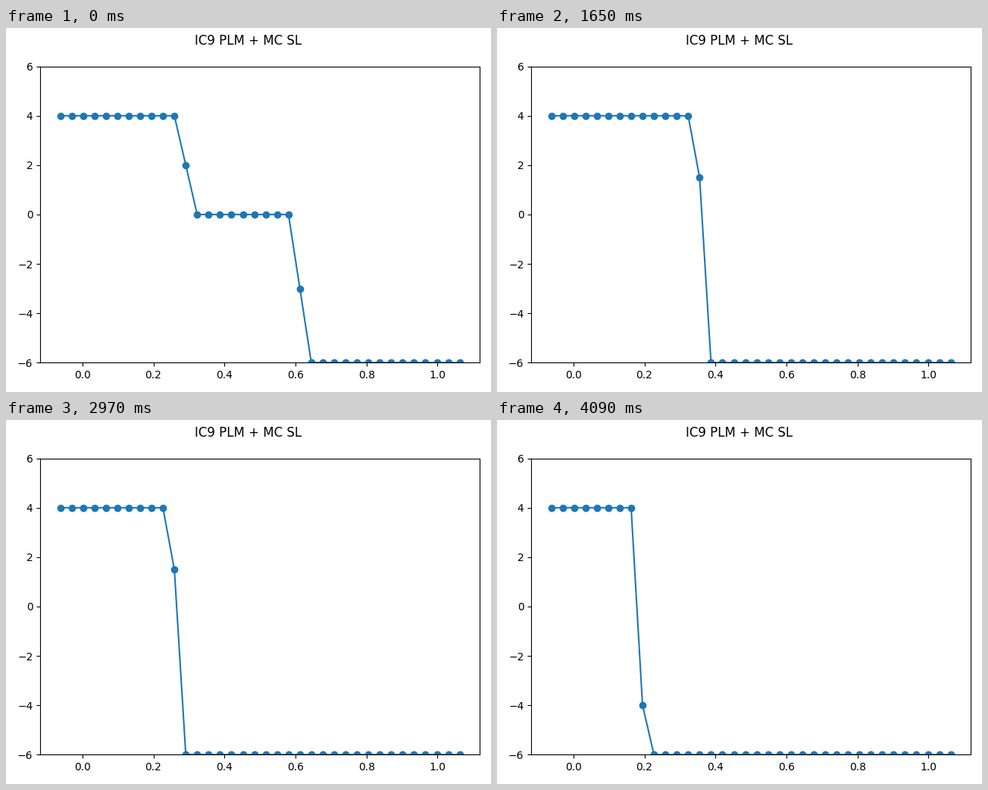
A matplotlib script that plays this animation: 640 by 480 pixels, repeating every 4.16 s.

```python
import numpy as np
import matplotlib.pyplot as plt
from matplotlib.animation import FuncAnimation

CELLS, GHOSTS = 32, 2
LOOP_MS, TICK_MS, STEP_MS = 4160, 20, 66
LEAD_MS = 16  # keeps each step from falling a whole tick late
CFL, V_MAX = 0.9, 6.0
HEIGHT = 480

pad = GHOSTS / CELLS
x = np.linspace(-pad, 1 + pad, CELLS + 2 * GHOSTS)
dx = x[1] - x[0]
ratio = CFL / V_MAX  # dt / dx


def initial(s):
    return np.where(s < 0.3, 4.0, np.where(s < 0.6, 0.0, -6.0))


def step(u):
    """Advance Burgers' equation by one Godunov step."""
    left, right = np.maximum(u[:-1], 0), np.minimum(u[1:], 0)
    flux = 0.5 * np.maximum(left**2, right**2)
    new = u.copy()
    new[1:-1] -= ratio * np.diff(flux)
    return new


# Cell averages from the values at both cell edges
states = [0.5 * (initial(x - dx / 2) + initial(x + dx / 2))]
while len(states) * STEP_MS < LOOP_MS - TICK_MS:
    states.append(step(states[-1]))

fig, ax = plt.subplots(figsize=(6.4, HEIGHT / 100), dpi=100)
fig.suptitle("IC9 PLM + MC SL", y=1 - 7.6 / HEIGHT)
line, = ax.plot(x, states[0], "o-", color="#1f77b4")
ax.set_ylim(-6, 6)
fig.tight_layout()
fig.subplots_adjust(top=1 - 50.6 / HEIGHT)


def update(i):
    line.set_ydata(states[(i * TICK_MS + LEAD_MS) // STEP_MS])
    return line,


anim = FuncAnimation(fig, update, frames=LOOP_MS // TICK_MS, interval=TICK_MS,
                     repeat=True, repeat_delay=0)
plt.show()
```
